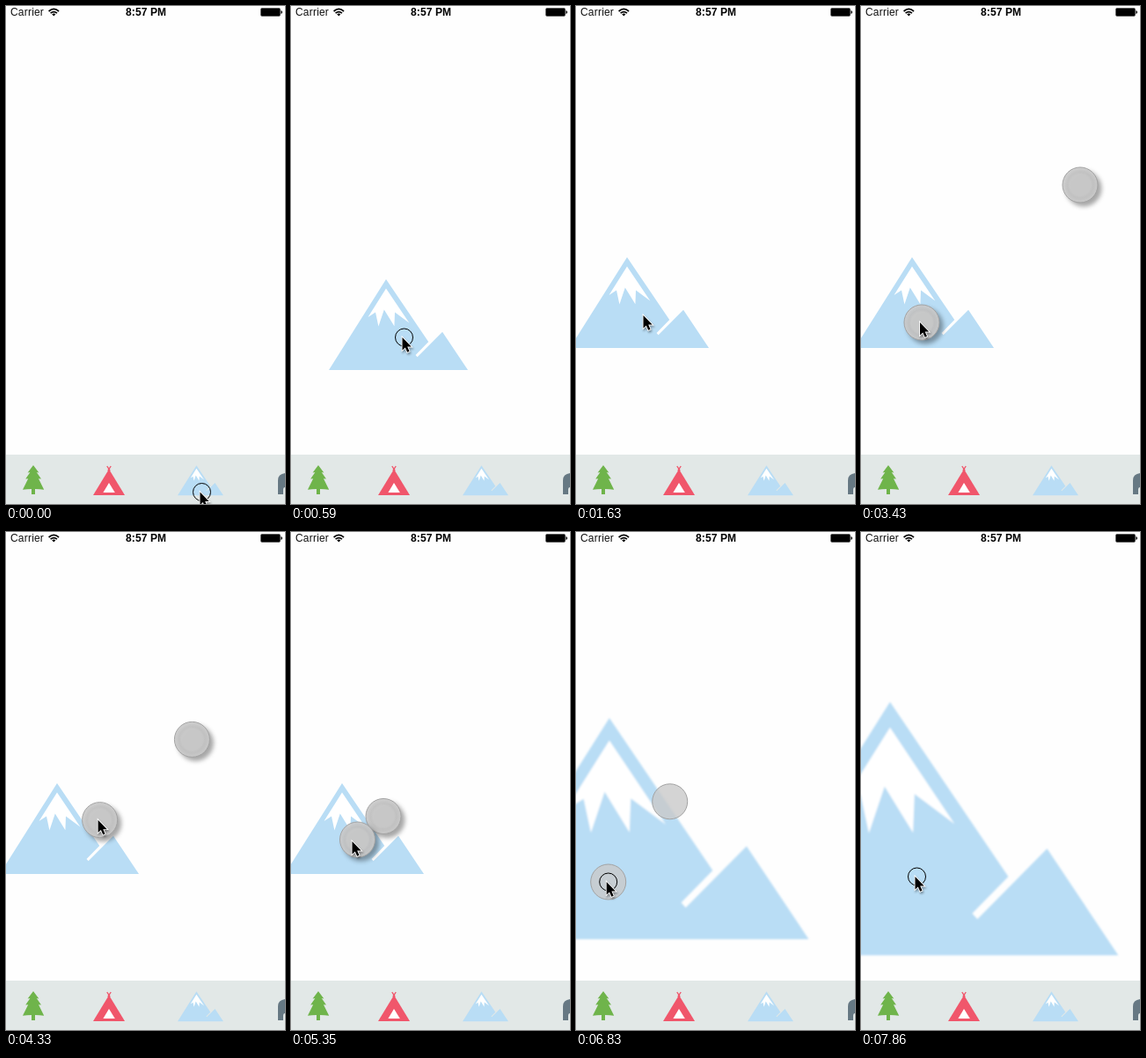
An HTML page for the animation above (8 s loop, 317 px wide and 565 px high).

```html
<!DOCTYPE html>
<html lang="en">
<head>
<meta charset="utf-8">
<title>Drag and pinch</title>
<style>
  html, body { margin: 0; width: 100%; height: 100%; overflow: hidden; background: #fefefe; }
  svg { display: block; width: 317px; height: 565px; }
  text { font-family: "Liberation Sans", Arial, sans-serif; font-size: 12px; }
  #cursor { filter: drop-shadow(1px 2px 1px rgba(0, 0, 0, .35)); }
  .pad { fill: url(#disc); stroke: #a2a2a2; }
  .raised .pad { filter: drop-shadow(4px 4px 2.5px rgba(0, 0, 0, .36)); }
  .pressed .pad { fill: #cacaca; fill-opacity: .8; }
</style>
</head>
<body>
<svg viewBox="0 0 317 565">
  <defs>
    <filter id="soft" x="-5%" y="-5%" width="110%" height="110%">
      <feGaussianBlur stdDeviation=".4"/>
    </filter>
    <radialGradient id="disc">
      <stop offset=".6" stop-color="#c8c8c8" stop-opacity=".97"/>
      <stop offset=".74" stop-color="#c2c2c2" stop-opacity=".95"/>
      <stop offset="1" stop-color="#cbcbcb" stop-opacity=".93"/>
    </radialGradient>
    <g id="peak">
      <path fill="#b9ddf5" d="M0 0L48.2 71 33.5 86l2.1 2.3L64 59.7 93 103H-65Z"/>
      <path fill="#fff" d="M0 10.4L26.3 49.6 10 37.4 9.4 53.2-2.2 34.4-8.6 53.4-12 37.6-20.5 43Z"/>
    </g>
  </defs>

  <rect width="317" height="565" fill="#fefefe"/>
  <text x="5" y="11.4" letter-spacing=".2" fill="#111">Carrier</text>
  <text x="159" y="11.3" font-weight="700" text-anchor="middle" textLength="46">8:57 PM</text>
  <g fill="none" stroke="#000" stroke-width="1.7">
    <path d="M48.6 6q5.7-5.2 11.4 0M50.6 8.2q3.7-3.2 7.4 0"/>
    <path d="M52.2 9.3q2.1-1.6 4.2 0L54.3 11.6Z" fill="#000" stroke="none"/>
  </g>
  <rect x="289.5" y="2.5" width="22" height="9" rx="1.4" fill="#000" stroke="#555" stroke-width=".8"/>
  <path d="M312.4 5q1.6.5 1.6 2t-1.6 2Z"/>

  <rect y="509" width="317" height="56" fill="#e2e8e7"/>
  <path fill="#6fb44b" d="M31 521l6.4 8.4-2.6-.3 5.2 7.4-3-.3 6.2 12.6q-5-.9-10.2-.9v6.2h-4v-6.2q-5.2 0-10 .9l6.2-12.6-3 .3 5.2-7.4-2.8.3Z"/>
  <path fill="#f0566b" d="M117 525.5L135 555H99Z"/>
  <path fill="none" stroke="#f0566b" stroke-width="1.4" d="M114.8 522l3.4 5.4M119.2 522l-3.4 5.4"/>
  <path fill="#fff" d="M117 541l6.8 11h-13.4Z"/>
  <use href="#peak" transform="translate(216.4 521.3) scale(.329)"/>
  <path fill="#667883" d="M317 530q-8 1-8 8v16h6v-5q0-3 2-3Z"/>

  <g id="mountain"><use href="#peak" x="-14" y="-51.5" filter="url(#soft)"/></g>
  <g id="pads">
    <circle class="pad" id="upper" r="20"/>
    <circle class="pad" id="lower" r="20"/>
  </g>
  <circle id="ring" r="10" fill="none" stroke="#000"/>
  <path id="cursor" stroke="#fff" stroke-width="1.8" paint-order="stroke"
    d="M0 0V14.4L3.3 11.4 5.7 16.8 8 15.8 5.7 10.5H10.2Z"/>
</svg>
<script>
const LOOP = 8000;
const START = { x: 222.5, y: 551.5 };
const GRIP = { x: -6.5, y: -14.5 };      // mountain centre relative to the finger
const PAIR = { x: 29.5, y: -26.5 };      // gap between the fingers while moved together
const MID_A = { x: 159, y: 281 };
const MID_B = { x: 71.7, y: 351.4 };
const PINCH_BASE = 47.2;

// Each move runs in even hard steps from first to last towards x, y.
const moves = [
  { first: 150, last: 590, steps: 4, x: 128.5, y: 376, ring: 1 },
  { first: 740, last: 1190, steps: 4, x: 89.5, y: 357, ring: 1 },
  { first: 1330, last: 1480, steps: 2, x: 81.5, y: 353, ring: 1 },
  { first: 1630, x: 78.5, y: 351 },
  { first: 2380, last: 2680, steps: 3, x: 69, y: 359 },
  { first: 3430, x: 69, y: 359, pads: "raised", mid: MID_A },
  { first: 4030, last: 4770, steps: 6, x: 144.2, y: 294.3, pads: "raised", mid: MID_A },
  { first: 5060, last: 5350, steps: 3, x: 75.5, y: 349, pads: "raised", lag: { x: -4, y: 2 } },
  { first: 5500, last: 5650, steps: 2, x: 57, y: 364.7, pads: "raised" },
  { first: 6240, x: 57, y: 364.7, pads: "pressed", mid: MID_B, ring: 1 },
  { first: 6540, last: 6830, steps: 3, x: 36.7, y: 397, pads: "pressed", mid: MID_B, ring: 1 },
  { first: 6970, x: 33.5, y: 405, pads: "pressed", mid: MID_B, ring: 1 },
  { first: 7270, x: 33.5, y: 405 },
  { first: 7570, last: 7720, steps: 2, x: 53.5, y: 395.7 },
  { first: 7860, x: 63.5, y: 391, ring: 1 }
];

const el = id => document.getElementById(id);
const [mountain, pads, upper, lower, ring, cursor] =
  ["mountain", "pads", "upper", "lower", "ring", "cursor"].map(el);
const place = (node, p, scale = 1) =>
  node.setAttribute("transform", `translate(${p.x} ${p.y}) scale(${scale})`);
const show = (node, on) => node.setAttribute("visibility", on ? "visible" : "hidden");
const add = (a, b) => ({ x: a.x + b.x, y: a.y + b.y });
const mirror = (p, mid) => ({ x: 2 * mid.x - p.x, y: 2 * mid.y - p.y });

function fingerAt(t) {
  const i = moves.findLastIndex(m => m.first <= t);
  if (i < 0) return { move: { ring: 1 }, p: START };
  const move = moves[i], from = moves[i - 1] || START;
  const { first, last = first, steps = 1 } = move;
  const gap = steps > 1 ? (last - first) / (steps - 1) : 1;
  const done = Math.min(steps, Math.floor((t - first) / gap + 1.01)) / steps;
  return {
    move,
    p: { x: from.x + (move.x - from.x) * done, y: from.y + (move.y - from.y) * done }
  };
}

function zoomAt(t) {
  const { p } = fingerAt(Math.min(t, 6970));
  return t < 6240 ? 1 : Math.max(1, 2 * Math.hypot(p.x - MID_B.x, p.y - MID_B.y) / PINCH_BASE);
}

function draw(t) {
  const { move, p } = fingerAt(t);
  show(mountain, t >= 440);
  place(mountain, add(fingerAt(Math.min(t, 1630)).p, GRIP), zoomAt(t));

  show(pads, move.pads);
  pads.setAttribute("class", move.pads || "");
  place(lower, p);
  place(upper, move.mid ? mirror(p, move.mid) : add(p, PAIR));

  show(ring, move.ring);
  place(ring, p);
  place(cursor, add(add(p, { x: -2, y: 0 }), move.lag || { x: 0, y: 0 }));
}

const begin = performance.now();
function tick() {
  draw((performance.now() - begin) % LOOP);
  requestAnimationFrame(tick);
}
tick();
</script>
</body>
</html>
```
